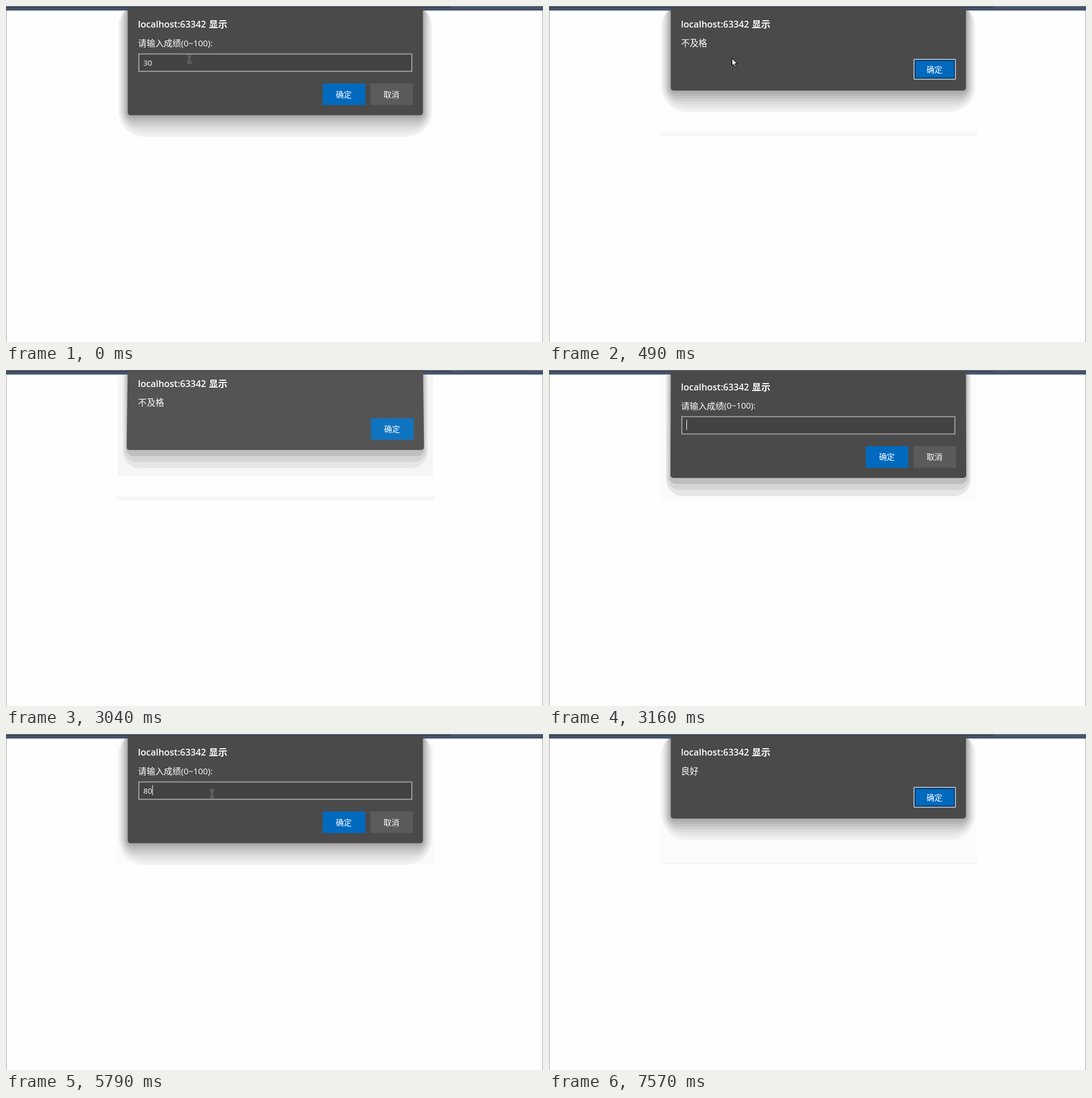
An HTML page with a canvas that plays this animation: 946 px wide and 592 px high, repeating every 8 s.

```html
<!DOCTYPE html>
<html lang="zh">
<head>
<meta charset="utf-8">
<style>
html, body { margin: 0; width: 100%; height: 100%; overflow: hidden; background: #fefefe }
canvas { display: block }
</style>
</head>
<body>
<canvas id="stage" width="946" height="592"></canvas>
<script>
const c = document.getElementById('stage').getContext('2d');
const LOOP = 8000;
const FONT = '"Open Sans", "Noto Sans CJK SC", "Noto Sans CJK", sans-serif';
const CJK = '"Noto Sans CJK SC", "Noto Sans CJK", sans-serif';
const FAIL = '不及格', GOOD = '良好';

// Dialog states: start, message (none = prompt), vertical offset, tilt, halo
const dialogs = [
  { t: 0, halo: 'none' },
  { t: 370, dy: -8, tilt: 2, halo: 'none' },
  { t: 490, msg: FAIL, halo: 'stripe' },
  { t: 3040, msg: FAIL, dy: -8, tilt: 2, halo: 'panel' },
  { t: 3160, dy: -2.3, tilt: .5, halo: 'soft' },
  { t: 3280, halo: 'soft' },
  { t: 6320, dy: -3, tilt: .7, halo: 'soft' },
  { t: 6440, msg: GOOD, dy: -8, tilt: 2, halo: 'edge' },
  { t: 6560, msg: GOOD, dy: -2.3, tilt: .5, halo: 'edge' },
  { t: 6680, msg: GOOD, halo: 'edge' }
];
const halos = {
  none: [],
  stripe: [[195, 8, 559, 213, '#fdfdfd'], [195, 221, 559, 9, '#f7f7f7']],
  panel: [[195, 8, 559, 213, '#fdfdfd'], [195, 221, 559, 9, '#f7f7f7'], [197, 8, 555, 178, '#f5f5f5']],
  soft: [[195, 8, 559, 222, '#fbfbfb']],
  edge: [[195, 8, 559, 222, '#fbfbfb'], [195, 227, 559, 3, '#f6f6f6']]
};
const pointers = [
  [0, 'beam', 323, 93], [370, 'arrow', 322, 92], [900, 'arrow', 279, 80],
  [1050, 'arrow', 34, 61], [1200], [3430, 'arrow', 391, 117],
  [3550, 'beam', 375, 109], [3670, 'beam', 363, 105],
  [6320, 'arrow', 363, 105], [7180, 'arrow', 15, 55], [7300]
];
const typed = [[0, '30', 0], [370, '30', 0], [3160, '', 1], [3430, '', 0], [3920, '', 1],
  [4480, '', 0], [5000, '', 1], [5390, '8', 1], [5790, '80', 1], [6320, '80', 0]];

const at = (list, t) => list.findLast(s => (s.t ?? s[0]) <= t);

function rect(x, y, w, h, color) {
  c.fillStyle = color;
  c.fillRect(x, y, w, h);
}

function text(s, x, y, size, family = FONT, weight = 400, color = '#fff') {
  c.font = `${weight} ${size}px ${family}`;
  c.fillStyle = color;
  c.fillText(s, x, y);
}

function shadow(bottom, settled, dy) {
  const n = settled ? 8 : 3;
  const side = settled ? 16.5 : 8.5, drop = settled ? 38 : 32, r = settled ? 46 : 30;
  const first = settled ? 242 : 230, last = settled ? 172 : 190;
  for (let i = 0; i < n; i++) {
    const k = 1 - i / n, v = first + (last - first) * (i / (n - 1)) ** 1.3;
    const top = 3 + dy - 12 * k;
    c.fillStyle = `rgb(${v},${v},${v})`;
    c.beginPath();
    c.roundRect(214.5 - side * k, top, 520 + 2 * side * k, bottom + drop * k - top, 5 + (r - 5) * k);
    c.fill();
  }
}

function panel(bottom, dy, tilt) {
  const l = 214.5, r = 734.5, top = 3 + dy;
  c.beginPath();
  c.moveTo(l, top);
  c.lineTo(r, top);
  c.arcTo(r + tilt, bottom, l - tilt, bottom, 5);
  c.arcTo(l - tilt, bottom, l, top, 5);
  c.closePath();
  c.fillStyle = tilt > 1 ? '#545454' : '#4a4a4a';
  c.fill();
}

function button(label, x, y, color) {
  rect(x, y, 75, 38, color);
  text(label, x + 23, y + 24, 14, CJK);
}

function focusButton(x, y) {
  c.fillStyle = '#9fb3c6';
  c.beginPath();
  c.roundRect(x, y, 75, 37, 2);
  c.fill();
  rect(x + 2, y + 2, 71, 33, '#173a5c');
  rect(x + 4, y + 4, 67, 29, '#006abf');
  text('确定', x + 23, y + 23.5, 14, CJK);
}

function prompt(t, tilt) {
  text('请输入成绩', 232.5, 71, 15.2, CJK);
  text('(0~100):', 308.5, 70.5, 14.9);
  rect(233, 83.5, 483, 32.5, '#9b9b9b');
  rect(235, 85.5, 479, 28.5, '#434343');
  const [, value, caret] = at(typed, t);
  text(value, 242, 105, 13.4);
  if (caret) rect(242 + value.length * 7.8, 90, 1, 18, '#fff');
  button('确定', 558 + tilt / 4, 136.5, tilt > 1 ? '#0f74c0' : '#006abf');
  button('取消', 642 + tilt / 2, 136.5, tilt > 1 ? '#636363' : '#5b5b5b');
}

function alertBox(msg, tilt) {
  text(msg, 232.5, 71, 15.4, CJK);
  if (tilt > 1) button('确定', 643, 93, '#0f74c0');
  else focusButton(642, 93);
}

function pointer(kind, x, y) {
  c.save();
  c.translate(x, y);
  c.beginPath();
  if (kind === 'arrow') {
    [[.5, .5], [.5, 13], [3.2, 10.4], [5.4, 15], [7.4, 14], [5.4, 9.7], [9.3, 9.5]]
      .forEach(p => c.lineTo(...p));
    c.closePath();
    c.fillStyle = '#fff';
    c.strokeStyle = '#000';
    c.lineWidth = 1;
    c.fill();
    c.stroke();
  } else if (kind === 'beam') {
    c.moveTo(-3.5, -6.5); c.lineTo(3.5, -6.5);
    c.moveTo(-3.5, 6.5); c.lineTo(3.5, 6.5);
    c.moveTo(0, -6.5); c.lineTo(0, 6.5);
    c.strokeStyle = '#c4c4c4';
    c.lineWidth = 2.6;
    c.stroke();
    c.strokeStyle = '#000';
    c.lineWidth = 1.1;
    c.stroke();
  }
  c.restore();
}

function draw(t) {
  const { msg, dy = 0, tilt = 0, halo } = at(dialogs, t);
  const bottom = (msg ? 149 : 192.5) + dy;
  rect(0, 0, 946, 592, '#fefefe');
  halos[halo].forEach(h => rect(...h));
  shadow(bottom, !dy, dy);

  // Browser edge and window border
  rect(0, 0, 946, 8, '#44546a');
  rect(0, 0, 946, 1, '#7c828b');
  rect(1, 1, 782, 2, '#3b4350');
  rect(0, 8, 1, 584, '#a2a2a2');
  rect(945, 8, 1, 584, '#a2a2a2');

  panel(bottom, dy, tilt);
  c.save();
  c.translate(0, dy);
  text('localhost:63342', 232.5, 38, 16, FONT, 600);
  text('显示', 357.5, 38, 16.2, CJK, 700);
  if (msg) alertBox(msg, tilt);
  else prompt(t, tilt);
  c.restore();
  pointer(...at(pointers, t).slice(1));
}

function frame() {
  draw(performance.now() % LOOP);
  requestAnimationFrame(frame);
}
frame();
</script>
</body>
</html>
```
